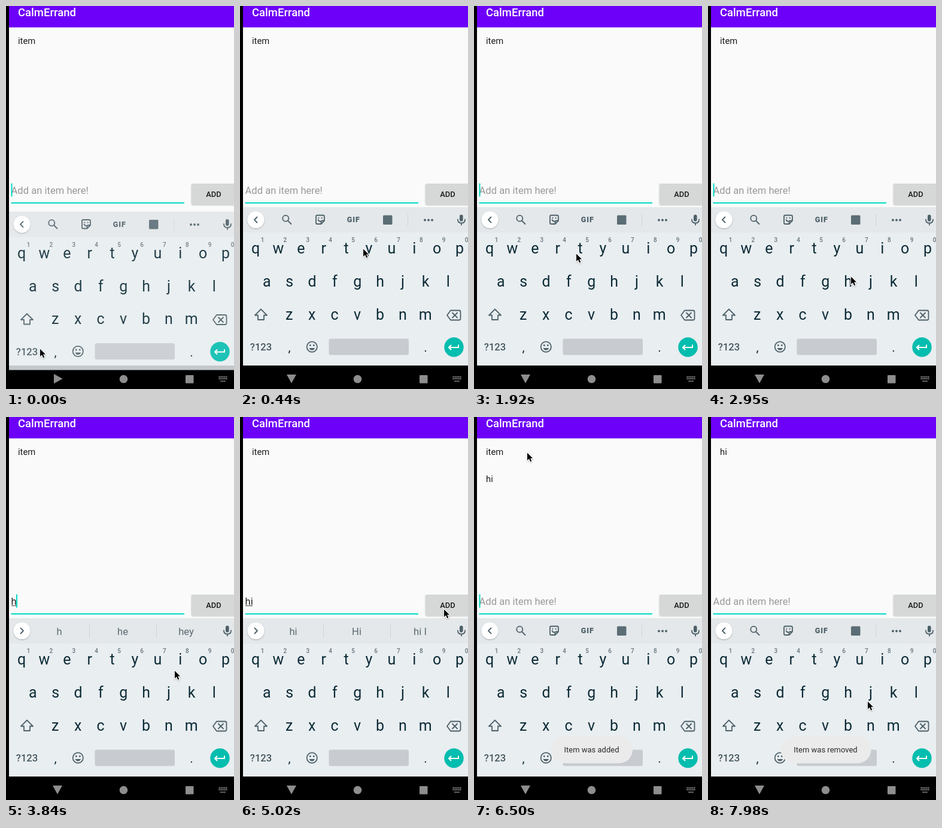
Write an HTML page that moves like this. It is 381 px wide and 636 px high and loops after 8000 ms.

```html
<!DOCTYPE html>
<html lang="en">
<head>
<meta charset="utf-8">
<title>To-do list demo</title>
<style>
  html, body { margin: 0; width: 100%; height: 100%; overflow: hidden; background: #000; }
  svg { display: block; width: 381px; height: 636px; font-family: Roboto, "Noto Sans", sans-serif; }
  .mid { text-anchor: middle; }
  .keys { font-size: 25px; fill: #0c2b36; }
  .marks { font-size: 21px; fill: #0c2b36; }
  .hints { font-size: 10px; font-weight: 500; fill: #65747b; }
  .body { font-size: 14.8px; fill: #1d1d1d; }
  .field { font-size: 16.6px; }
  .words { font-size: 16.6px; fill: #5a6a71; }
  .line { fill: none; stroke: #4d6069; stroke-width: 1.8; stroke-linejoin: round; stroke-linecap: round; }
  .solid { fill: #4d6069; }
  .toast { font-size: 13px; fill: #2b2b2b; }
</style>
</head>
<body>
<svg viewBox="0 0 381 636">
  <defs>
    <filter id="soft" x="-20%" y="-20%" width="140%" height="150%">
      <feDropShadow dx="0" dy="1" stdDeviation="1" flood-opacity=".3"/>
    </filter>
  </defs>
  <rect width="381" height="636"/>
  <rect x="5" width="376" height="600" fill="#fafafa"/>
  <rect x="5" width="376" height="35.5" fill="#6d00f8"/>
  <text x="20" y="17" font-size="18.5" font-weight="500" fill="#fff">CalmErrand</text>

  <text id="first" class="body" x="20" y="63"></text>
  <text id="second" class="body" x="20" y="108"></text>

  <text id="entry" class="field" x="8.5" y="312"></text>
  <rect id="composing" x="9" y="313" height="1" fill="#444"/>
  <rect x="8.500" y="326" width="289.500" height="2" fill="#03dac5"/>
  <rect id="caret" y="294.500" width="2" height="22" fill="#03dac5"/>
  <rect id="button" x="310" y="295" width="80" height="34.5" rx="2" filter="url(#soft)"/>
  <text class="mid" x="347" y="317" font-size="12.9" font-weight="500" fill="#1b1b1b">ADD</text>

  <g id="keyboard">
    <rect x="5" y="334" width="376" height="264" fill="#e9eef1"/>
    <rect x="5" y="334" width="376" height="42" fill="#e4e8ea"/>
    <circle cx="26.5" cy="355" r="14" fill="#fff" filter="url(#soft)"/>
    <path id="chevron" class="line"/>

    <g id="tools">
      <g class="line">
        <circle cx="76.3" cy="352.7" r="5"/>
        <path d="M80 356.5l5.5 5.5"/>
        <path d="M129 347.5h10q2 0 2 2v7l-5.5 5.5h-6.500q-2 0-2-2v-10.500q0-2 2-2zM141 356.500h-3.500q-2 0-2 2v3.500M130.500 355q1.500 3 4 2.500"/>
      </g>
      <path class="solid" d="M130.500 351h1.800v2h-1.800zM135.800 351h1.800v2h-1.800z"/>
      <text class="solid mid" x="189.800" y="359.300" font-size="12.500" font-weight="900" letter-spacing="1">GIF</text>
      <rect x="239" y="347.500" width="15.500" height="15.500" rx="1.500" fill="#5b6d75"/>
      <path d="M280.500 345v21" stroke="#d0d5d8"/>
      <g class="solid"><circle cx="309" cy="355.500" r="1.900"/><circle cx="315" cy="355.500" r="1.900"/><circle cx="321" cy="355.500" r="1.900"/></g>
    </g>
    <g id="suggestions" class="words mid">
      <path d="M139.500 345v21M251.500 345v21" stroke="#cdd2d5"/>
      <text x="89" y="361.500"></text><text x="195" y="361.500"></text><text x="301" y="361.500"></text>
    </g>

    <rect class="solid" x="367" y="346.500" width="5.600" height="11" rx="2.800"/>
    <path class="line" d="M364 354.500q0 6 6 6t6-6M370 361v2.500"/>

    <g id="letters" class="keys mid"></g>
    <g id="hints" class="hints mid"></g>

    <g class="line">
      <path d="M35 503.500l10 10h-5v7.500h-10v-7.500h-5z"/>
      <path d="M352 505.500h14q2.500 0 2.500 2.500v11q0 2.500-2.500 2.500h-14l-6-8zM355 509.500l8 8M363 509.500l-8 8"/>
      <circle cx="120.300" cy="566" r="8.600"/>
    </g>
    <g class="solid">
      <circle cx="117.300" cy="563.500" r="1.400"/><circle cx="123.300" cy="563.500" r="1.400"/>
      <path d="M115.500 568h9.600q-1.500 3.500-4.800 3.500t-4.800-3.500z"/>
    </g>
    <text class="mid" x="35" y="572" font-size="16.600" font-weight="500" fill="#45575f">?123</text>
    <text class="marks mid" x="82.500" y="574">,</text>
    <text class="marks mid" x="310" y="574">.</text>
    <rect x="148.500" y="552.500" width="133.500" height="27" rx="3" fill="#c8ccd0"/>
    <circle cx="357.500" cy="566.500" r="16.200" fill="#03bdae"/>
    <path d="M365 562.500v4.500h-15M353 563l-4 4 4 4" fill="none" stroke="#fff" stroke-width="2"/>
  </g>

  <rect x="5" y="597" width="376" height="12" fill="#c4c8ca"/>
  <rect id="nav" width="381" height="50"/>
  <g fill="#8e8e8e">
    <path id="back" d="M78 612h16l-8 14.500z"/>
    <circle cx="196.500" cy="619.500" r="6.800"/>
    <rect x="300" y="613" width="13.500" height="13.500" rx="1"/>
  </g>
  <path d="M355.500 616h14M355.500 619h14M358.500 623h8" stroke="#8e8e8e" stroke-width="2" stroke-dasharray="2 1"/>

  <g id="added" class="toast mid">
    <rect x="129" y="530" width="136" height="45" rx="22.500" fill="#ebebec"/>
    <text x="196.500" y="557">Item was added</text>
  </g>
  <g id="removed" class="toast mid">
    <rect x="121.500" y="530" width="151" height="45" rx="22.500" fill="#ebebec"/>
    <text x="196.500" y="557">Item was removed</text>
  </g>

  <g id="pointer" filter="url(#soft)">
    <path d="M1 1.500v12.500l3-2.800 2.300 5 2-.9-2.200-4.900h4z" stroke="#fff" stroke-width="2" paint-order="stroke"/>
  </g>
</svg>

<script>
const LOOP = 8000, TICK = 147.78, LAST_TICK = 54;
const $ = id => document.getElementById(id);

function addText(parent, text, x, y) {
  const node = document.createElementNS('http://www.w3.org/2000/svg', 'text');
  node.textContent = text;
  node.setAttribute('x', x);
  node.setAttribute('y', y);
  parent.append(node);
}

[['qwertyuiop', 26, 411], ['asdfghjkl', 44.7, 466], ['zxcvbnm', 82.3, 520.5]]
  .forEach(([row, x, y]) => [...row].forEach((key, i) => addText($('letters'), key, x + i * 37.9, y)));
[...'1234567890'].forEach((digit, i) => addText($('hints'), digit, 37.5 + i * 37.9, 392));

// Each table row starts with the tick at which it applies.
const pointerPath = [
  [0, 56, 568], [1, 75, 545], [2, 150, 455], [3, 205, 402], [4, 205, 402],
  [5, 225, 406], [7, 290, 412], [9, 294, 416], [11, 235, 412], [13, 170, 410],
  [14, 170, 412], [18, 225, 442], [20, 238, 448], [21, 237, 452], [23, 237, 456],
  [26, 281, 420], [28, 287, 408], [30, 287, 408], [31, 298, 395], [33, 335, 330],
  [34, 340, 318], [36, 340, 318], [38, 300, 301], [40, 200, 180], [42, 110, 80],
  [44, 88, 58], [48, 88, 58], [50, 95, 75], [52, 190, 300], [54, 266, 471]
];
const addedFade = [[37, 0], [38, .5], [39, .9], [40, 1], [49, 1], [50, .4], [51, 0]];
const removedFade = [[51, 0], [52, .5], [53, .9], [54, 1]];
const slide = [[0, 7.5], [1, 2], [2, 0]];
const caretOff = [[3, 5], [9, 11], [16, 18], [27, 28], [33, 35], [39, 41], [46, 48], [52, 54]];
const entries = [
  [0, '', 8.5, []],
  [23, 'h', 17, ['h', 'he', 'hey']],
  [29, 'hi', 21, ['hi', 'Hi', 'hi I']],
  [36, '', 8.5, []]
];

function sample(table, tick) {
  const next = table.findIndex(row => row[0] > tick);
  if (next === 0) return table[0].slice(1);
  if (next < 0) return table[table.length - 1].slice(1);
  const a = table[next - 1], b = table[next];
  const p = (tick - a[0]) / (b[0] - a[0]);
  return a.slice(1).map((v, i) => v + (b[i + 1] - v) * p);
}

const set = (id, name, value) => $(id).setAttribute(name, value);
const show = (id, on) => set(id, 'visibility', on ? 'visible' : 'hidden');

function render(tick) {
  const [x, y] = sample(pointerPath, tick).map(Math.round);
  set('pointer', 'transform', `translate(${x} ${y})`);

  const [, typed, caretX, words] = entries.filter(row => row[0] <= tick).pop();
  $('entry').textContent = typed || 'Add an item here!';
  set('entry', 'fill', typed ? '#222' : '#999');
  set('composing', 'width', typed ? caretX - 9 : 0);
  set('caret', 'x', caretX);
  show('caret', !caretOff.some(([from, to]) => tick >= from && tick <= to));

  show('tools', !typed);
  show('suggestions', typed);
  $('suggestions').querySelectorAll('text').forEach((node, i) => node.textContent = words[i] || '');
  set('chevron', 'd', typed ? 'M24.5 350.5l4.5 4.5-4.5 4.5' : 'M28.5 350.5l-4.5 4.5 4.5 4.5');

  $('first').textContent = tick < 48 ? 'item' : 'hi';
  $('second').textContent = tick >= 36 && tick < 48 ? 'hi' : '';
  set('button', 'fill', tick >= 35 && tick < 38 ? '#c2c3c3' : '#d6d7d7');

  const [drop] = sample(slide, tick);
  set('keyboard', 'transform', `translate(0 ${drop})`);
  set('keyboard', 'opacity', 1 - drop * .014);
  set('nav', 'y', 597 + drop);
  set('back', 'transform', `rotate(${-12 * drop} 86.5 618.5)`);

  set('added', 'opacity', sample(addedFade, tick)[0]);
  set('removed', 'opacity', sample(removedFade, tick)[0]);
}

function frame() {
  const time = performance.now() % LOOP;
  render(Math.min(LAST_TICK, Math.floor((time + 9) / TICK)));
  requestAnimationFrame(frame);
}
frame();
</script>
</body>
</html>
```
